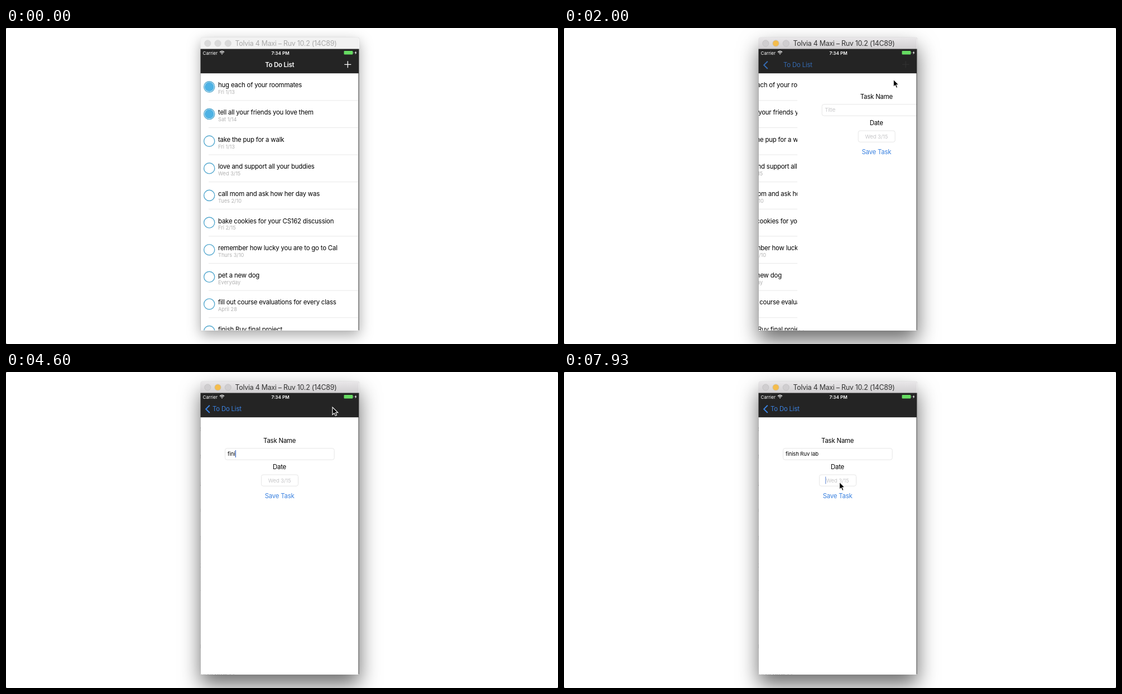
Recreate the animation shown at these times as an HTML page. Size 989 by 566 pixels, loop 8000 ms.

```html
<!DOCTYPE html>
<html lang="en">
<head>
<meta charset="utf-8">
<title>To Do List</title>
<style>
html, body { margin: 0; width: 100%; height: 100%; overflow: hidden; background: #444; }
#stage { position: absolute; inset: 0; background: #fff; border-radius: 2px; overflow: hidden; }
#shadow { position: absolute; left: 348.5px; top: 17px; width: 284px; height: 524.5px;
  border-radius: 4px 4px 0 0; box-shadow: 0 8px 25px rgba(0,0,0,.35), 0 0 1px rgba(0,0,0,.3); }
#shadow.active { box-shadow: 0 18px 36px rgba(0,0,0,.58), 0 0 1px rgba(0,0,0,.4); }
svg { position: absolute; left: 0; top: 0; }
text { font: 11.4px Inter, "Liberation Sans", sans-serif; letter-spacing: -.017em; white-space: pre; }
.mid { text-anchor: middle; }
.blue { fill: #3b82e0; }
.small { font-size: 9.2px; letter-spacing: 0; fill: #b2b2b2; }
.status { font-size: 8.1px; letter-spacing: 0; fill: #fff; }
.input { font-size: 9.5px; letter-spacing: -.01em; }
.hint { fill: #c6c6c8; }
.bold { font-weight: 600; }
.box { fill: #fff; stroke: #e6e6e6; }
#caption { font-size: 12.4px; letter-spacing: -.02em; }
</style>
</head>
<body>
<div id="stage">
<div id="shadow"></div>
<svg width="989" height="566" viewBox="0 0 989 566">
  <defs>
    <linearGradient id="chrome" x2="0" y2="1">
      <stop stop-color="#e9e7e9"/><stop offset="1" stop-color="#d0ced0"/>
    </linearGradient>
    <clipPath id="screen"><rect x="348.5" y="81" width="284" height="460.5"/></clipPath>
  </defs>

  <path id="frame" d="M348.5 38V21a4 4 0 0 1 4-4H628.5a4 4 0 0 1 4 4V38Z"/>
  <g id="lights" stroke-width=".7">
    <circle cx="361.3" cy="27.5" r="5.6"/>
    <circle id="yellow" cx="379.5" cy="27.5" r="5.6"/>
    <circle cx="397.8" cy="27.5" r="5.6"/>
  </g>
  <text id="caption" class="mid" x="501.5" y="32">Tolvia 4 Maxi – Ruv 10.2 (14C89)</text>

  <g clip-path="url(#screen)">
    <rect x="348" y="81" width="285" height="461" fill="#fff"/>
    <g id="list"></g>
    <g id="form">
      <rect x="348.5" y="81" width="284" height="461" fill="#fff"/>
      <text class="mid" x="490.2" y="127">Task Name</text>
      <rect class="box" x="392.5" y="136.8" width="195.7" height="20.4" rx="3.5"/>
      <text id="hint" class="input hint" x="397.5" y="150">Title</text>
      <text id="typed" class="input" x="397" y="150"></text>
      <text class="mid" x="490" y="174">Date</text>
      <rect class="box" x="457.5" y="184" width="66" height="20.3" rx="3.5"/>
      <text class="input hint mid" x="490.2" y="197.5">Wed 3/15</text>
      <text class="mid blue" x="490.2" y="226">Save Task</text>
      <rect id="caret" width="1.4" height="13" fill="#4a76cc"/>
    </g>
  </g>

  <rect x="348.5" y="37.5" width="284" height="43.7" fill="#242424"/>
  <text class="status" x="352.5" y="47.5">Carrier</text>
  <g fill="none" stroke="#fff" stroke-width="1.2">
    <path d="M383 43.2Q387 39.4 391 43.2M384.7 45Q387 42.8 389.3 45"/>
    <path d="M386.2 46.6h1.6"/>
  </g>
  <text class="status bold mid" x="491.5" y="47.5">7:34 PM</text>
  <rect x="605.5" y="41" width="15.8" height="6.6" rx="1" fill="#66dc62"/>
  <path d="M622 43v2.6" stroke="#8c8c8c"/>
  <path d="M627.4 41l-3 3.8h2l-1 3 3-4h-2z" fill="#fff"/>
  <text id="heading" class="bold mid" x="490.3" y="70.3" fill="#fff">To Do List</text>
  <path id="plus" d="M606.3 65.3h12M612.3 59.3v12" stroke="#fff" stroke-width="1.3"/>
  <path id="chevron" d="M364.8 59.8L358.2 66.4L364.8 73" fill="none" stroke="#3b82e0" stroke-width="2"/>
  <text id="back" class="blue" x="370" y="70.3">To Do List</text>

  <path d="M632 81V541.5" stroke="#444" stroke-width="1.2"/>
  <path d="M348.5 81V541.5" stroke="#999" stroke-width=".6"/>

  <g id="cursor">
    <g id="ring" fill="none">
      <circle r="19.2" stroke="#000" stroke-width="2.2"/>
      <circle r="17.6" stroke="#fff" stroke-width=".9" opacity=".65"/>
    </g>
    <path d="M0 0V13.5L3.1 10.6L5.2 15.4L7.5 14.4L5.5 9.8H9.7Z" stroke="#fff" stroke-width="1.1"/>
  </g>
</svg>
</div>
<script>
const $ = id => document.getElementById(id);
const LOOP = 8000, ACTIVATE = 1600, PUSH = 1850, NAME_FOCUS = 2720, DATE_FOCUS = 7380;

const tasks = [
  ['hug each of your roommates', 'Fri 1/13'],
  ['tell all your friends you love them', 'Sat 1/14'],
  ['take the pup for a walk', 'Fri 1/13'],
  ['love and support all your buddies', 'Wed 3/15'],
  ['call mom and ask how her day was', 'Tues 2/10'],
  ['bake cookies for your CS162 discussion', 'Fri 2/15'],
  ['remember how lucky you are to go to Cal', 'Thurs 3/10'],
  ['pet a new dog', 'Everyday'],
  ['fill out course evaluations for every class', 'April 28'],
  ['finish Ruv final project', 'May 1'],
];
$('list').innerHTML = tasks.map(([name, date], i) => `
  <g transform="translate(0 ${i * 48.63})">
    <circle cx="364.2" cy="105.4" r="9.6" fill="#fff" stroke="#56a9cf" stroke-width="1.4"/>
    ${i < 2 ? '<circle cx="364.2" cy="105.4" r="8.3" fill="#4eb2e4"/>' : ''}
    <text x="380" y="106.4">${name}</text>
    <text class="small" x="380" y="118.3">${date}</text>
    <path d="M363 129.8H631" stroke="#e8e8e8"/>
  </g>`).join('');

// time, x, y of the pointer
const path = [
  [70, 600, 568], [870, 624, 108], [1000, 624, 108], [1480, 615, 65], [PUSH, 615, 65],
  [2270, 531, 157], [2560, 510, 146], [2900, 510, 146], [3500, 585, 63],
  [6800, 585, 63], [7300, 493.5, 197],
];
const clicks = [[ACTIVATE, PUSH], [2640, 2780], [7340, 7460]];
const phrase = 'finish Ruv lab';
const keys = [4200, 4330, 4470, 4600, 4700, 4900, 5000, 5300, 5400, 5470, 5570, 6000, 6150, 6300];

function pointer(t) {
  const i = path.findIndex(p => p[0] > t);
  if (i < 0) return path[path.length - 1].slice(1);
  const [t0, x0, y0] = path[Math.max(0, i - 1)], [t1, x1, y1] = path[i];
  const u = t1 > t0 ? (t - t0) / (t1 - t0) : 0, e = u * u * (3 - 2 * u);
  return [x0 + (x1 - x0) * e, y0 + (y1 - y0) * e];
}

function pushed(t) {
  const w = Math.max(0, t - PUSH) * .018;
  return w > 12 ? 1 : 1 - (1 + w) * Math.exp(-w);
}

// Solid, fade out, hidden, fade in
function blink(age) {
  const s = age % 1000;
  return s < 500 ? 1 : s < 650 ? (650 - s) / 150 : s < 850 ? 0 : (s - 850) / 150;
}

const set = (id, name, value) => $(id).setAttribute(name, value);
const fade = (id, a) => set(id, 'opacity', a);
const shift = (id, x, y = 0) => set(id, 'transform', `translate(${x} ${y})`);

function draw(t) {
  const active = t >= ACTIVATE, p = pushed(t);
  const pressed = clicks.some(([a, b]) => t >= a && t < b);

  $('shadow').className = active ? 'active' : '';
  set('frame', 'fill', active ? 'url(#chrome)' : '#f2f2f2');
  set('lights', 'fill', active ? '#d0ced0' : '#dadada');
  set('lights', 'stroke', active ? '#bcbcbc' : '#cecece');
  set('yellow', 'fill', active ? '#f5bd4c' : '#dadada');
  set('caption', 'fill', active ? '#333' : '#aaa');

  shift('list', -85 * p);
  shift('form', 284 * (1 - p));
  shift('heading', -94 * p);
  shift('back', 94 * (1 - p));
  fade('heading', Math.max(0, 1 - 1.5 * p));
  fade('back', p);
  fade('chevron', p);
  fade('plus', (active ? .2 : 1) * (1 - p));

  const count = keys.filter(k => k <= t).length;
  $('typed').textContent = phrase.slice(0, count);
  fade('hint', count ? 0 : 1);

  const onDate = t >= DATE_FOCUS;
  const x = onDate ? 468 : 397.3 + (count ? $('typed').getComputedTextLength() : 0);
  const since = onDate ? DATE_FOCUS : count ? keys[count - 1] : NAME_FOCUS;
  shift('caret', x, onDate ? 187.5 : 140);
  fade('caret', t < NAME_FOCUS ? 0 : blink(t - since));

  shift('cursor', ...pointer(t));
  fade('cursor', t < path[0][0] ? 0 : 1);
  fade('ring', pressed ? 1 : 0);
}

const start = performance.now();
function tick() {
  draw((performance.now() - start) % LOOP);
  requestAnimationFrame(tick);
}
tick();
</script>
</body>
</html>
```
